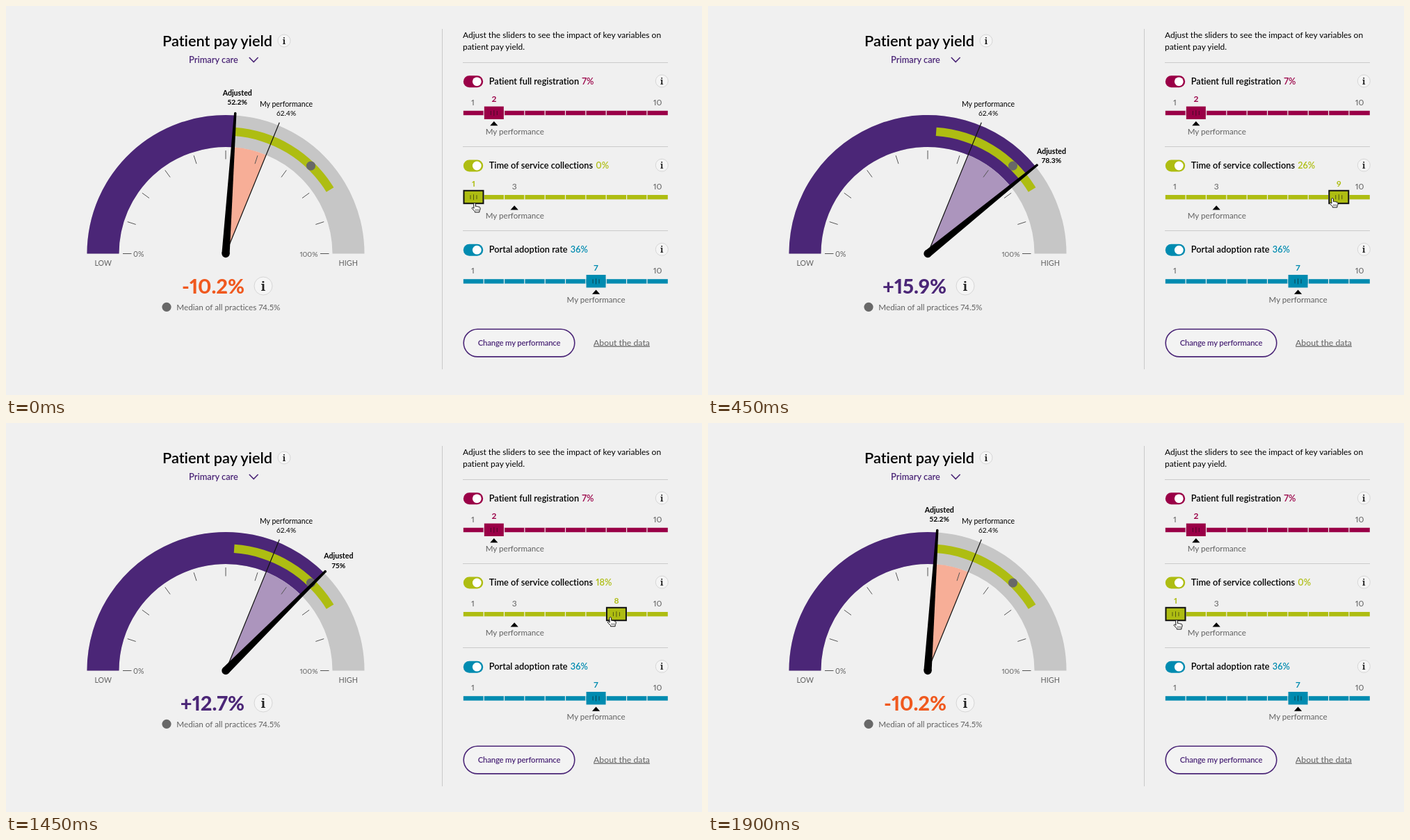
An HTML page for the animation above (2.6 s loop, 1001x560 px).

```html
<!DOCTYPE html>
<html lang="en">
<head>
<meta charset="utf-8">
<title>Patient pay yield</title>
<style>
  html, body { margin: 0; width: 100%; height: 100%; overflow: hidden; background: #f0f0f0; }
  svg {
    display: block; width: 1001px; height: 560px; font-family: Lato, "Open Sans", sans-serif;
    font-variant-ligatures: none; font-variant-numeric: proportional-nums;
  }
  .mid { text-anchor: middle; }
  .end { text-anchor: end; }
  .med { font-weight: 600; }
  .bold { font-weight: 700; }
  .heavy { font-weight: 800; }
  .grey { fill: #626262; }
  .info { font: 700 13px "Noto Serif", serif; text-anchor: middle; fill: #222; }
</style>
</head>
<body>
<svg id="stage" viewBox="0 0 1001 560"></svg>
<script>
const LOOP = 2600, STEP = 50;
const CX = 316, CY = 356.5, OUTER = 199.5, INNER = 153.5;
const MINE = 62.36;
const PURPLE = '#4b2677', ORANGE = '#f0591f', GREEN = '#aebd12';
const SLOT = 29.35, BAR_X = 657.8;

// Adjusted yield and collection rate for each slider position 1 to 10
const yields = [52.16, 58.4, 62.36, 65.27, 67.7, 70.17, 72.6, 75.03, 78.3, 82.53];
const rates = [0, 1, 4, 6, 8, 10, 14, 18, 26, 36];

// Pointer height over time
const pointerY = [[0, 283.5], [300, 275], [600, 278], [1300, 279.3], [1650, 279.5], [1900, 283.5], [2600, 283.5]];

const $ = id => document.getElementById(id);
const slotX = v => BAR_X + (v - .5) * SLOT;
const percent = n => +n.toFixed(1) + '%';

function polar(pct, r) {
  const a = (pct - 50) * Math.PI / 100;
  return [CX + r * Math.sin(a), CY - r * Math.cos(a)];
}
const at = (pct, r) => polar(pct, r).map(n => n.toFixed(2)).join(' ');

function band(from, to, r0, r1) {
  return `M${at(from, r1)}A${r1} ${r1} 0 0 1 ${at(to, r1)}L${at(to, r0)}A${r0} ${r0} 0 0 0 ${at(from, r0)}Z`;
}
function wedge(a, b) {
  const [from, to] = a < b ? [a, b] : [b, a];
  return `M${CX} ${CY}L${at(from, INNER)}A${INNER} ${INNER} 0 0 1 ${at(to, INNER)}Z`;
}

const text = (x, y, size, str, cls = '', attrs = '') =>
  `<text x="${x}" y="${y}" font-size="${size}" class="${cls}" ${attrs}>${str}</text>`;
const line = (x1, y1, x2, y2, color, w = 1) =>
  `<path d="M${x1} ${y1}L${x2} ${y2}" stroke="${color}" stroke-width="${w}"/>`;
const info = (x, y, r = 9) =>
  `<circle cx="${x}" cy="${y}" r="${r}" fill="#f5f5f5" stroke="#d6d6d6"/>` +
  `<text x="${x}" y="${y + r * .5}" class="info" style="font-size:${r * 1.4}px">i</text>`;

function ticks() {
  let out = line(168, CY, 180.5, CY, '#555') + line(452, CY, 464.5, CY, '#555');
  for (let p = 10; p < 100; p += 10)
    out += `<path d="M${at(p, 136)}L${at(p, 148.5)}" stroke="#555"/>`;
  return out;
}

function gauge() {
  const [dotX, dotY] = polar(74.5, 176);
  return text(304, 57.5, 21.7, 'Patient pay yield', 'mid med') + info(400, 50) +
    text(298.5, 82, 12.8, 'Primary care', 'mid med', `fill="${PURPLE}"`) +
    `<path d="M349.8 74L356.2 80.5L362.6 74" fill="none" stroke="${PURPLE}" stroke-width="1.6"/>` +
    `<path d="${band(0, 100, INNER, OUTER)}" fill="#c6c6c6"/>` +
    `<path id="fill" fill="${PURPLE}"/><path id="wedge"/>` + ticks() +
    `<path d="${band(52.2, 82.5, 169.8, 182.2)}" fill="${GREEN}"/>` +
    `<path d="M${CX} ${CY}L${at(MINE, 204)}" stroke="#111" stroke-width="1.2"/>` +
    `<circle cx="${dotX}" cy="${dotY}" r="6.6" fill="#686868"/>` +
    `<g id="needle"><path d="M${CX - 5.6} ${CY}L${CX - 1.7} 153.3Q${CX} 151.5 ${CX + 1.7} 153.3L${CX + 5.6} ${CY}Z"/>` +
    `<circle cx="${CX}" cy="${CY}" r="5.7"/></g>` +
    text(403, 144.5, 10.5, 'My performance', 'mid') + text(403, 157.7, 10.2, percent(MINE), 'mid') +
    `<g id="adjusted">` + text(1.3, -.3, 10.6, 'Adjusted', 'mid bold') +
    text(1.3, 12.9, 10.3, '', 'mid bold', 'id="yield"') + '</g>' +
    text(183, 360.5, 10.6, '0%', 'grey') + text(448.5, 360.5, 10.4, '100%', 'end grey') +
    text(139.7, 373.5, 10.6, 'LOW', 'mid grey') + text(492.3, 373.5, 10.8, 'HIGH', 'mid grey') +
    text(343, 414, 29, '', 'end heavy', 'id="delta"') + info(370, 403, 13) +
    '<circle cx="231" cy="433.3" r="6.6" fill="#686868"/>' +
    text(245.3, 437.6, 11.7, 'Median of all practices 74.5%', 'grey');
}

function slider(i, { name, color, rate, value, mine, live }) {
  const id = s => live ? `id="${s}"` : '';
  let out = `<g transform="translate(0 ${i * 121.2})">` +
    `<rect x="657.8" y="100.3" width="28.4" height="17" rx="8.5" fill="${color}"/>` +
    '<circle cx="677.3" cy="108.8" r="6.4" fill="#fff"/>' +
    text(694.7, 113, 12.8, `${name} <tspan dx="1" ${id('rate')} fill="${color}">${rate}%</tspan>`, 'med') +
    info(943.3, 108) +
    text(671.5, 143, 12, '1', 'mid grey', id('low')) + text(937, 143, 12, '10', 'mid grey', id('high')) +
    (live ? text(slotX(mine), 143, 12, mine, 'mid grey', 'id="mid"') : '') +
    `<rect x="${BAR_X}" y="150.8" width="294" height="6.4" fill="${color}"/>`;
  for (let k = 1; k < 10; k++) {
    const x = BAR_X + k * SLOT;
    out += line(x, 150.5, x, 157.5, '#f0f0f0', 1.2);
  }
  const mx = slotX(mine), edge = live ? 'stroke="#111" stroke-width="2"' : '';
  out += `<path d="M${mx - 5.6} 172.3L${mx} 166L${mx + 5.6} 172.3Z"/>` +
    text(Math.max(mx, 731.8), 184.7, 11.6, 'My performance', 'mid grey') +
    `<g ${id('handle')} transform="translate(${slotX(value)} 0)">` +
    text(0, 138.4, 12, value, 'mid bold', `${id('value')} fill="${color}"`) +
    `<rect x="-14" y="144.6" width="28" height="18.4" fill="${color}" ${edge}/>` +
    '<g opacity=".6">' + line(-4.5, 151, -4.5, 157, '#111') + line(0, 150, 0, 158, '#111') +
    line(4.5, 151, 4.5, 157, '#111') + '</g></g></g>';
  return out;
}

function panel() {
  const sliders = [
    { name: 'Patient full registration', color: '#9a0047', rate: 7, value: 2, mine: 2 },
    { name: 'Time of service collections', color: GREEN, rate: 0, value: 1, mine: 3, live: true },
    { name: 'Portal adoption rate', color: '#008bb0', rate: 36, value: 7, mine: 7 }
  ];
  return line(627.5, 33, 627.5, 523, '#c9c9c9') +
    text(657, 46, 12, 'Adjust the sliders to see the impact of key variables on') +
    text(657, 62.7, 12, 'patient pay yield.') +
    [81.5, 202.5, 323.5].map(y => line(657, y, 952, y, '#cbcbcb')).join('') +
    sliders.map((s, i) => slider(i, s)).join('') +
    `<rect x="658.2" y="465.3" width="159.6" height="39.6" rx="19.8" fill="#f3f3f3" stroke="${PURPLE}" stroke-width="1.6"/>` +
    text(738, 489.3, 11.3, 'Change my performance', 'mid med', `fill="${PURPLE}" letter-spacing="-.15"`) +
    text(845, 488.5, 12.3, 'About the data', 'grey', 'text-decoration="underline"');
}

const pointer = '<g id="pointer"><path d="M-1.4 .9Q0 -.7 1.3 .9L1.5 5.2Q2.6 4.4 3.6 5.3Q4.9 4.7 5.8 5.8' +
  'Q7.3 5.3 7.9 6.8V9.4L6.9 11.4V13.4H.3V12.2L-3.9 7.9Q-4 6.4 -2.6 6.6L-1 7.8Z" fill="#fff" stroke="#111" stroke-width="1"/>' +
  '<path d="M1.6 9V11.4M3.5 9V11.4M5.4 9V11.4" stroke="#111" stroke-width=".7"/></g>';

$('stage').innerHTML = gauge() + panel() + pointer;

// Half linear, half cosine
const ease = u => u / 2 + (1 - Math.cos(Math.PI * u)) / 4;
const clamp = u => Math.min(1, Math.max(0, u));

function travel(t) {
  return t < 1250 ? ease(clamp(t / 600) ** .8) : 1 - ease(clamp((t - 1250) / 650));
}

function lerpKeys(keys, t) {
  const i = Math.max(1, keys.findIndex(k => k[0] >= t));
  const [t0, a] = keys[i - 1], [t1, b] = keys[i];
  return a + (b - a) * (t - t0) / (t1 - t0);
}

function render(t) {
  const drag = travel(t) * 264.5;
  const v = Math.min(10, 1 + Math.round(drag / SLOT));
  const pct = yields[v - 1];
  const diff = pct - MINE;
  const down = diff < 0;

  $('pointer').setAttribute('transform', `translate(${674 + drag} ${lerpKeys(pointerY, t)})`);
  $('handle').setAttribute('transform', `translate(${slotX(v)} 0)`);
  $('value').textContent = v;
  $('rate').textContent = rates[v - 1] + '%';
  for (const [id, n] of [['low', 1], ['mid', 3], ['high', 10]])
    $(id).setAttribute('visibility', v === n ? 'hidden' : 'visible');

  $('fill').setAttribute('d', band(0, pct, INNER, OUTER));
  $('wedge').setAttribute('d', wedge(MINE, pct));
  $('wedge').setAttribute('fill', down ? '#f7ae97' : '#ac95bd');
  $('needle').setAttribute('transform', `rotate(${(pct - 50) * 1.8} ${CX} ${CY})`);

  // The label moves outward when it would cover its neighbour
  const [x, y] = polar(pct, Math.abs(diff) < 5 ? 254 : 227.5);
  $('adjusted').setAttribute('transform', `translate(${x} ${y})`);
  $('yield').textContent = percent(pct);
  $('delta').textContent = (down ? '' : '+') + percent(diff);
  $('delta').setAttribute('fill', down ? ORANGE : PURPLE);
}

const start = performance.now();
function tick() {
  const t = (performance.now() - start) % LOOP;
  render(Math.floor(t / STEP) * STEP);
  requestAnimationFrame(tick);
}
render(0);
requestAnimationFrame(tick);
</script>
</body>
</html>
```
